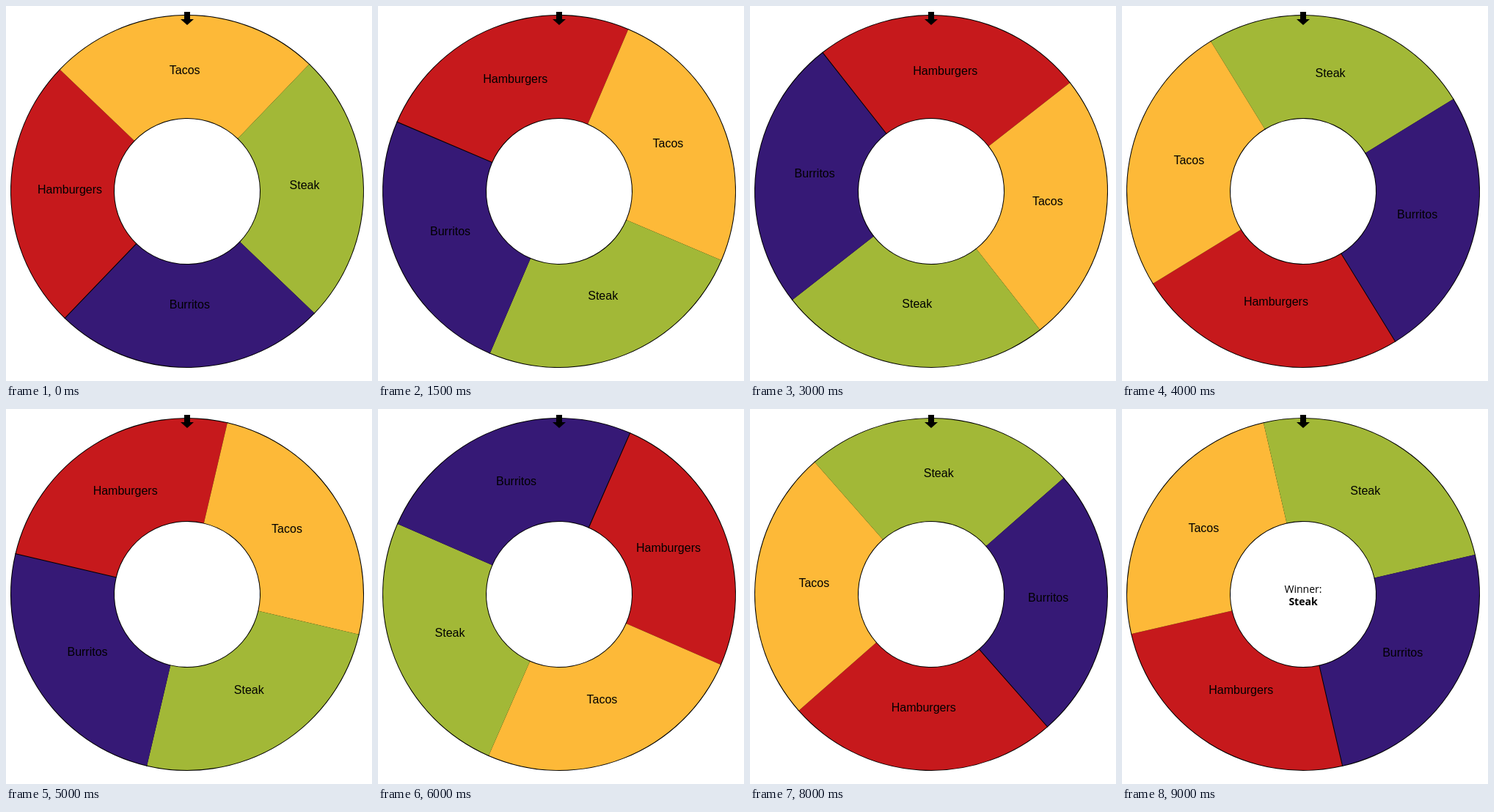
Write an HTML page with a canvas that moves like this. It is 499x512 px and loops after 10000 ms.

```html
<!DOCTYPE html>
<html lang="en">
<head>
<meta charset="utf-8">
<title>Food wheel</title>
<style>
html, body { margin: 0; width: 100%; height: 100%; overflow: hidden; background: #fff; }
canvas { display: block; }
</style>
</head>
<body>
<canvas id="stage" width="499" height="512"></canvas>
<script>
const ctx = document.getElementById('stage').getContext('2d');
const LOOP = 10000, STEP = 250, SPIN_START = 1500, SPIN_END = 9000;
const CX = 247, CY = 253, OUTER = 240, INNER = 100, TEXT_RADIUS = 160;
const ARC = Math.PI / 2;

const slices = [
  ['Hamburgers', '#c6191c'],
  ['Tacos', '#fdb938'],
  ['Steak', '#a2b837'],
  ['Burritos', '#361976']
];

// Wheel turn in degrees at a few moments of the spin (ms).
const turns = [
  [1280, -1.2], [2000, 212.8], [3000, 456.9], [4000, 643.4],
  [5000, 778.2], [7000, 948.3], [9000, 1022]
];

// Quartic ease-out that halts while still creeping; pace is its linear variable.
const GAIN = 0.036615, HALT = 5.3 ** 4, LAST = 1022;
const toPace = turn => ((LAST - turn) / GAIN + HALT) ** 0.25;
const toTurn = pace => LAST - GAIN * (pace ** 4 - HALT);

function turnAt(t) {
  if (t < SPIN_START) return turns[0][1];
  if (t >= SPIN_END) return LAST;
  const i = turns.findIndex(([time]) => time > t);
  const [t0, a0] = turns[i - 1], [t1, a1] = turns[i];
  const p0 = toPace(a0), p1 = toPace(a1);
  return toTurn(p0 + (p1 - p0) * (t - t0) / (t1 - t0));
}

function drawText(text, x, y, font) {
  ctx.font = font;
  ctx.fillStyle = '#000';
  ctx.fillText(text, x, y);
}

function drawSlice([label, color], start) {
  const end = start + ARC, mid = start + ARC / 2;
  ctx.beginPath();
  ctx.arc(CX, CY, OUTER, start, end);
  ctx.arc(CX, CY, INNER, end, start, true);
  // The path stays open, so the starting edge has no outline.
  ctx.stroke();
  ctx.fillStyle = color;
  ctx.fill();
  drawText(label, CX + Math.cos(mid) * TEXT_RADIUS, CY + Math.sin(mid) * TEXT_RADIUS,
    '16px "Liberation Sans", Helvetica, Arial, sans-serif');
}

function drawArrow() {
  const top = CY - OUTER;
  ctx.fillStyle = '#000';
  ctx.fillRect(CX - 4, top - 5, 8, 10);
  ctx.beginPath();
  ctx.moveTo(CX - 9, top + 5);
  ctx.lineTo(CX + 9, top + 5);
  ctx.lineTo(CX, top + 13);
  ctx.fill();
}

function draw(t) {
  ctx.fillStyle = '#fff';
  ctx.fillRect(0, 0, 499, 512);
  ctx.lineWidth = 2;
  ctx.strokeStyle = '#000';
  ctx.textAlign = 'center';
  const start = (turnAt(t) - 225) * Math.PI / 180;
  slices.forEach((slice, i) => drawSlice(slice, start + i * ARC));
  drawArrow();
  if (t >= SPIN_END) {
    const family = '14px "Open Sans", "Noto Sans", sans-serif';
    drawText('Winner:', CX, 251, family);
    drawText('Steak', CX, 268, 'bold ' + family);
  }
}

const origin = performance.now();
function tick() {
  const t = (performance.now() - origin) % LOOP;
  draw(Math.floor(t / STEP) * STEP);
  requestAnimationFrame(tick);
}
tick();
</script>
</body>
</html>
```
